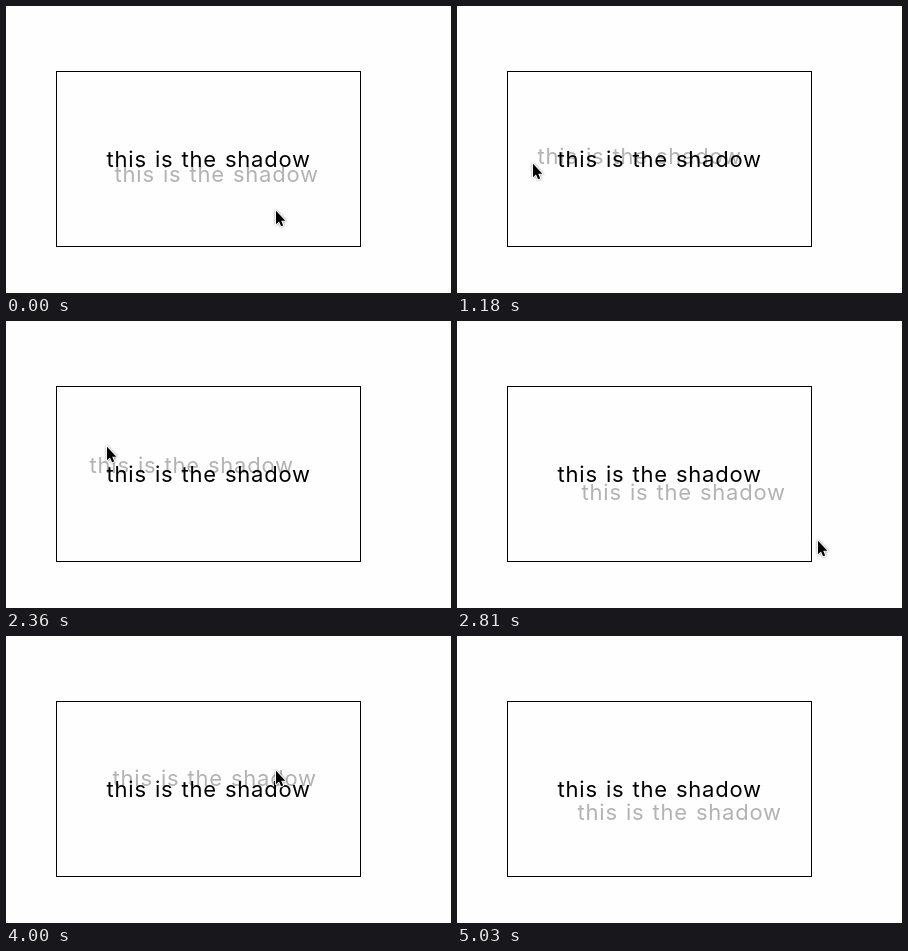
Animation, 445 px wide and 287 px high, one loop 5.63 s. Source, as an HTML page:

```html
<!DOCTYPE html>
<html lang="en">
<head>
<meta charset="utf-8">
<title>Mouse shadow</title>
<style>
  html, body { margin: 0; width: 100%; height: 100%; overflow: hidden; background: #fefefe; }
  svg { display: block; width: 445px; height: 287px; }
  text {
    font: 400 22px Inter, "Noto Sans", sans-serif;
    font-optical-sizing: none;
    letter-spacing: .78px;
    word-spacing: 1.1px;
  }
  #pointer { filter: drop-shadow(0 .5px .8px rgba(0, 0, 0, .45)); }
</style>
</head>
<body>
<svg viewBox="0 0 445 287">
  <rect x="50.5" y="65.5" width="304" height="175" fill="none" stroke="#000"/>
  <text id="shade" x="100.6" y="161" fill="#b3b3b3">this is the shadow</text>
  <text x="100.6" y="161">this is the shadow</text>
  <path id="pointer" d="M1 .8V14.2l3-2.8 2.1 4.9 2.1-.9-2-4.7h4.2z" stroke="#fff" stroke-width="1.8" stroke-linejoin="round" paint-order="stroke"/>
</svg>
<script>
const LOOP = 5630, STEP = 148, LEAD = 12, LAST = 34;
const WALK = 50, LAG = 0.45;
const BOX = { x: 50, y: 65, w: 305, h: 176 };

// Key points of the pointer's path: step, x, y.
const keys = [
  [-1, 229, 200], [0, 269, 204], [2, 314, 106], [4, 245, 75], [6, 150, 95],
  [8, 75, 157], [10, 165, 193], [12, 288, 148], [13, 245, 134], [16, 100, 125],
  [18, 320, 204], [19, 360, 219], [20, 368, 190], [23, 71, 140],
  [26, 197, 98], [27, 269, 134], [30, 310, 224], [32, 388, 258], [34, 480, 320]
];

// Smooth curve through the keys; axis 1 is x, axis 2 is y.
function slope(i, axis) {
  const a = keys[Math.max(i - 1, 0)], b = keys[Math.min(i + 1, keys.length - 1)];
  return (b[axis] - a[axis]) / (b[0] - a[0]);
}

function curve(s, axis) {
  const i = Math.max(keys.findIndex(key => key[0] >= s), 1) - 1;
  const a = keys[i], b = keys[i + 1], span = b[0] - a[0];
  const u = (s - a[0]) / span, v = 1 - u;
  return v * v * (1 + 2 * u) * a[axis] + u * u * (3 - 2 * u) * b[axis]
    + span * u * v * (v * slope(i, axis) - u * slope(i + 1, axis));
}

const at = s => [curve(s, 1), curve(s, 2)];
const walk = (pos, start, size) => Math.round((pos - start) / size * WALK - WALK / 2);
const inside = ([x, y]) => x > BOX.x && x < BOX.x + BOX.w && y > BOX.y && y < BOX.y + BOX.h;

// The shadow follows late and stays put while the pointer is outside the box.
function offset(step) {
  while (step > 0 && !inside(at(step - LAG))) step--;
  const [x, y] = at(step - LAG);
  return [walk(x, BOX.x, BOX.w), walk(y, BOX.y, BOX.h)];
}

const shade = document.getElementById("shade");
const pointer = document.getElementById("pointer");
const place = (el, [x, y]) => el.setAttribute("transform", `translate(${x} ${y})`);

function draw(time) {
  const step = Math.min(Math.floor((time % LOOP + LEAD) / STEP), LAST);
  place(pointer, at(step).map(Math.round));
  place(shade, offset(step));
}

const begin = performance.now();
function tick() {
  draw(performance.now() - begin);
  requestAnimationFrame(tick);
}
tick();
</script>
</body>
</html>
```
